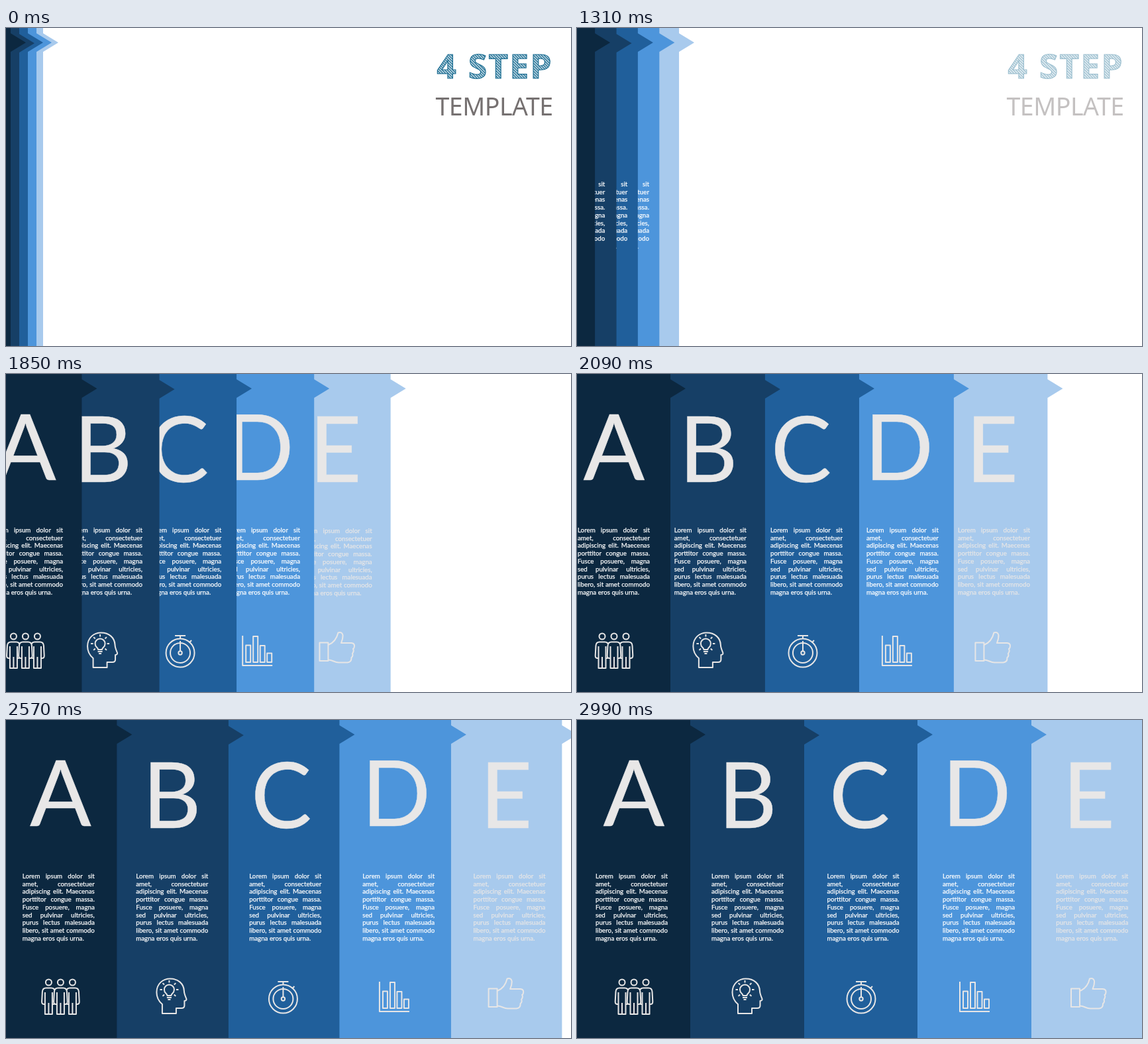
These frames come from a looping animation (853 by 480 pixels, 4120 ms). An HTML page:

```html
<!DOCTYPE html>
<html lang="en">
<head>
<meta charset="utf-8">
<title>4 step template</title>
<style>
  html, body { margin: 0; width: 100%; height: 100%; overflow: hidden; background: #fff; }
  #stage { position: relative; width: 853px; height: 480px; overflow: hidden; background: #fff; }
  #stage svg { position: absolute; left: 0; top: 0; width: 853px; height: 480px; }
  .letter { font: 137px Lato, sans-serif; fill: #e8e7e7; stroke: #e8e7e7; stroke-width: .5; }
  .icon { stroke: #e7e6e6; stroke-width: 2; stroke-linejoin: round; fill: none; }
  .copy {
    position: absolute; top: 230px; width: 109px; color: #fff;
    font: 9.75px/11.72px Lato, sans-serif; white-space: nowrap;
    -webkit-text-stroke: .25px;
  }
  .copy div { text-align: justify; text-align-last: justify; }
  .copy div:last-child { text-align-last: left; }
  .steps { font: 800 51px "Noto Sans", sans-serif; letter-spacing: 2.5px; fill: url(#hatch); stroke: #1c6d92; stroke-width: 1.2; }
  .word { font: 37.5px "Noto Sans", sans-serif; letter-spacing: -.5px; fill: #767171; }
</style>
</head>
<body>
<div id="stage">
  <svg id="title">
    <defs>
      <pattern id="hatch" width="2.83" height="2.83" patternUnits="userSpaceOnUse" patternTransform="rotate(45)">
        <rect width="3" height="3" fill="#e4f0f5"/>
        <rect width="3" height="1.6" fill="#1c6d92"/>
      </pattern>
    </defs>
    <text class="steps" x="650.5" y="75.5">4 STEP</text>
    <text class="word" x="648.5" y="131.5">TEMPLATE</text>
  </svg>
</div>
<script>
const LOOP = 4120, START = 1070, STEP = 60, FADE = 420;

// time in ms, progress, speed per second
const KEYS = [
  [1070, 0, 0], [1550, .372, 1.06], [1850, .655, .79],
  [2090, .817, .54], [2570, .978, .14], [2990, 1, 0]
];

const LINES = [
  'Lorem ipsum dolor sit', 'amet, consectetuer', 'adipiscing elit. Maecenas',
  'porttitor congue massa.', 'Fusce posuere, magna', 'sed pulvinar ultricies,',
  'purus lectus malesuada', 'libero, sit amet commodo', 'magna eros quis urna.'
];

const person = x => `<g transform="translate(${x})">
  <circle cy="396" r="4.5"/>
  <path d="M-5.5 429H-7Q-10.500 429 -10.300 425L-9.500 410Q-9 404.500 -4 404.500H4Q9 404.500 9.500 410
    L10.300 425Q10.500 429 7 429H5.500"/>
  <path d="M-5.500 411V444H5.500V411M0 427V444"/>
</g>`;

const people = color => `<g fill="${color}">${[68, 104, 86].map(person).join('')}</g>`;

const rays = () => [135, 180, 225, 270, 315, 360, 405].map(deg =>
  `<path d="M10.500 0H14" transform="translate(253.5 407) rotate(${deg})"/>`).join('');

const head = () => `
  <path d="M243 443V429C237 424 234.500 418 234.500 411C234.500 398 244 390.500 255 390.500
    C267 390.500 275.500 398 276 409C276 413 277.500 416 279.500 421Q280 423.500 276.500 424
    V431Q276.500 435 272 435H264V443Z"/>
  <path d="M250.500 416Q250.500 414 248.500 412.600A7.500 7.500 0 1 1 258.500 412.600Q256.500 414 256.500 416Z
    M250 419H257M251.500 422H255.500"/>
  ${rays()}`;

const stopwatch = () => `
  <circle cx="429" cy="421" r="21.5"/><circle cx="429" cy="421" r="15"/><circle cx="429" cy="421" r="2.7"/>
  <path d="M429 418V403M421 395H437M429 395V399M442.500 405.500L446 402"/>`;

const bar = (x, top) => `<path d="M${x} ${top}h7V435h-7Z"/>`;

const chart = () => `<path d="M578 395V440H623"/>` +
  bar(583, 409.5) + bar(594, 396) + bar(604.5, 410) + bar(615, 421.5);

const thumb = () => `
  <path d="M746 405.500H759V433H746Z"/>
  <path d="M759 409C767 406 772 399 774 390.500Q779.500 388.500 781 394C781.500 399 780 402 778.500 406
    H794Q799 406.500 798.500 411Q798.500 414 796.500 415Q798.500 418 795.500 422Q797 426 794 428
    Q794.500 435 788 435.500H775C768 435.500 766 431.500 759 431.500"/>`;

const PANELS = [
  { letter: 'A', color: '#0c2840', edge: 171, tip: 22, at: [39.6, 160], textX: 28, icon: people, move: 164, textMove: 147.8, textFrom: 1550 },
  { letter: 'B', color: '#163f66', edge: 343, tip: 23, at: [213.2, 163], textX: 203, icon: head, move: 323, textMove: 307.3 },
  { letter: 'C', color: '#205f9b', edge: 514, tip: 22, at: [380.7, 163], textX: 377.5, icon: stopwatch, move: 481, textMove: 467.5 },
  { letter: 'D', color: '#4d95db', edge: 686, tip: 22, at: [551.2, 160], textX: 552, icon: chart, move: 640, textMove: 629 },
  { letter: 'E', color: '#a8caed', edge: 857, tip: 22, at: [733, 163], textX: 723.3, icon: thumb, move: 801, textMove: 810.5,
    letterMove: 798, iconMove: 790, textRise: 2.4, textColor: '#e7e6e6' }
];

const stage = document.getElementById('stage');
const title = document.getElementById('title');
const movers = [], faders = [];

function addMover(el, dx, dy = 0) {
  movers.push({ el, dx, dy });
}

// The rightmost panel lies lowest.
for (const p of [...PANELS].reverse()) {
  const { edge, tip } = p;
  stage.insertAdjacentHTML('beforeend', `
    <svg>
      <path fill="${p.color}" d="M-900 0H${edge}V${tip - 14}L${edge + 23} ${tip}L${edge} ${tip + 14}V480H-900Z"/>
      <text class="letter" x="${p.at[0]}" y="${p.at[1]}">${p.letter}</text>
      <g class="icon">${p.icon(p.color)}</g>
    </svg>
    <div class="copy" style="left:${p.textX}px;color:${p.textColor || ''}">
      ${LINES.map(line => `<div>${line}</div>`).join('')}
    </div>`);
  const copy = stage.lastElementChild;
  const [shape, letter, icon] = copy.previousElementSibling.children;
  addMover(shape, p.move);
  addMover(letter, p.letterMove || p.move);
  addMover(icon, p.iconMove || p.move);
  addMover(copy, p.textMove, p.textRise);
  if (p.textFrom) faders.push({ el: copy, from: p.textFrom, length: 240 });
}
faders.push({ el: title, from: START + FADE, length: -FADE });

function progress(t) {
  if (t <= START) return 0;
  const i = KEYS.findIndex(key => key[0] >= t);
  if (i < 0) return 1;
  const [t0, y0, v0] = KEYS[i - 1], [t1, y1, v1] = KEYS[i];
  const span = t1 - t0, u = (t - t0) / span, w = 1 - u;
  return y0 * w * w * (1 + 2 * u) + y1 * u * u * (3 - 2 * u)
    + (v0 * w - v1 * u) * u * w * span / 1000;
}

function draw(now) {
  const time = now % LOOP;
  const t = START + Math.floor((time - START) / STEP) * STEP;
  const left = 1 - progress(t);
  for (const { el, dx, dy } of movers) {
    el.style.transform = `translate(${-dx * left}px, ${dy * left}px)`;
  }
  // A negative length fades out.
  for (const { el, from, length } of faders) {
    el.style.opacity = Math.max(0, Math.min(1, (t - from) / length));
  }
}

function tick() {
  draw(performance.now());
  requestAnimationFrame(tick);
}
tick();
</script>
</body>
</html>
```
